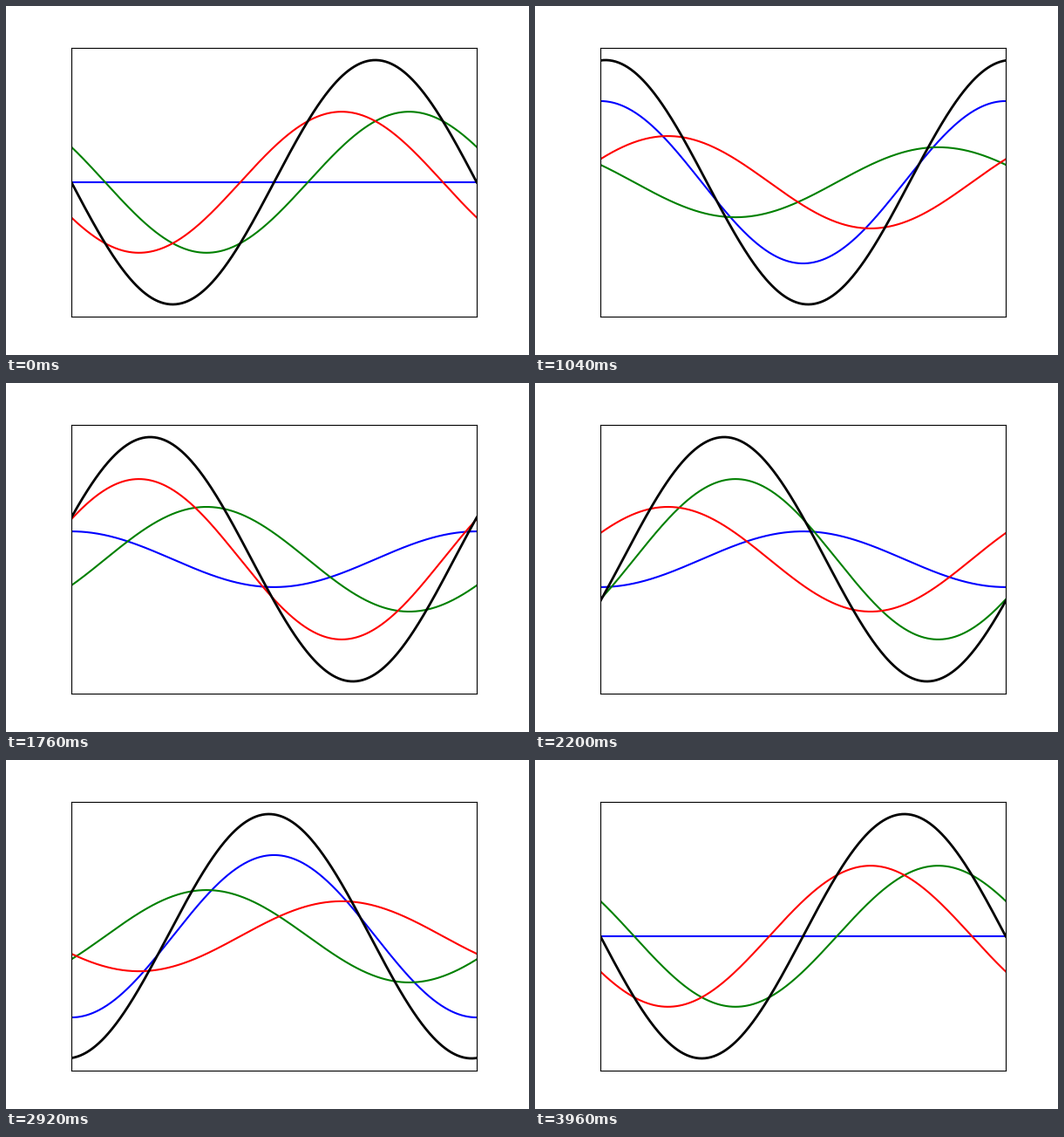
Recreate the animation shown at these times as a matplotlib script. Size 600 px wide and 400 px high, loop 4000 ms.

```python
import numpy as np
import matplotlib.pyplot as plt
from matplotlib.animation import FuncAnimation

FRAMES = 100
INTERVAL = 40
THIRD = 2 * np.pi / 3

x = np.linspace(0, 2 * np.pi, 400)
angles = np.linspace(0, 2 * np.pi, FRAMES)

fig, ax = plt.subplots(figsize=(6, 4), dpi=100)
fig.subplots_adjust(left=0.125, right=0.9, bottom=0.11, top=0.88)
ax.set(xlim=(0, 2 * np.pi), ylim=(-1.65, 1.65), xticks=[], yticks=[])

phases = [ax.plot([], [], color=c, lw=1.5)[0] for c in ("blue", "green", "red")]
total, = ax.plot([], [], color="black", lw=2)


def update(i):
    """Three standing waves, 120 degrees apart, add up to a travelling one."""
    waves = [np.sin(angles[i] - k * THIRD) * np.cos(x - k * THIRD)
             for k in range(3)]
    for line, wave in zip(phases, waves):
        line.set_data(x, wave)
    total.set_data(x, sum(waves))
    return [*phases, total]


anim = FuncAnimation(fig, update, frames=FRAMES, init_func=lambda: update(0),
                     interval=INTERVAL, repeat=True, repeat_delay=0)
plt.show()
```
